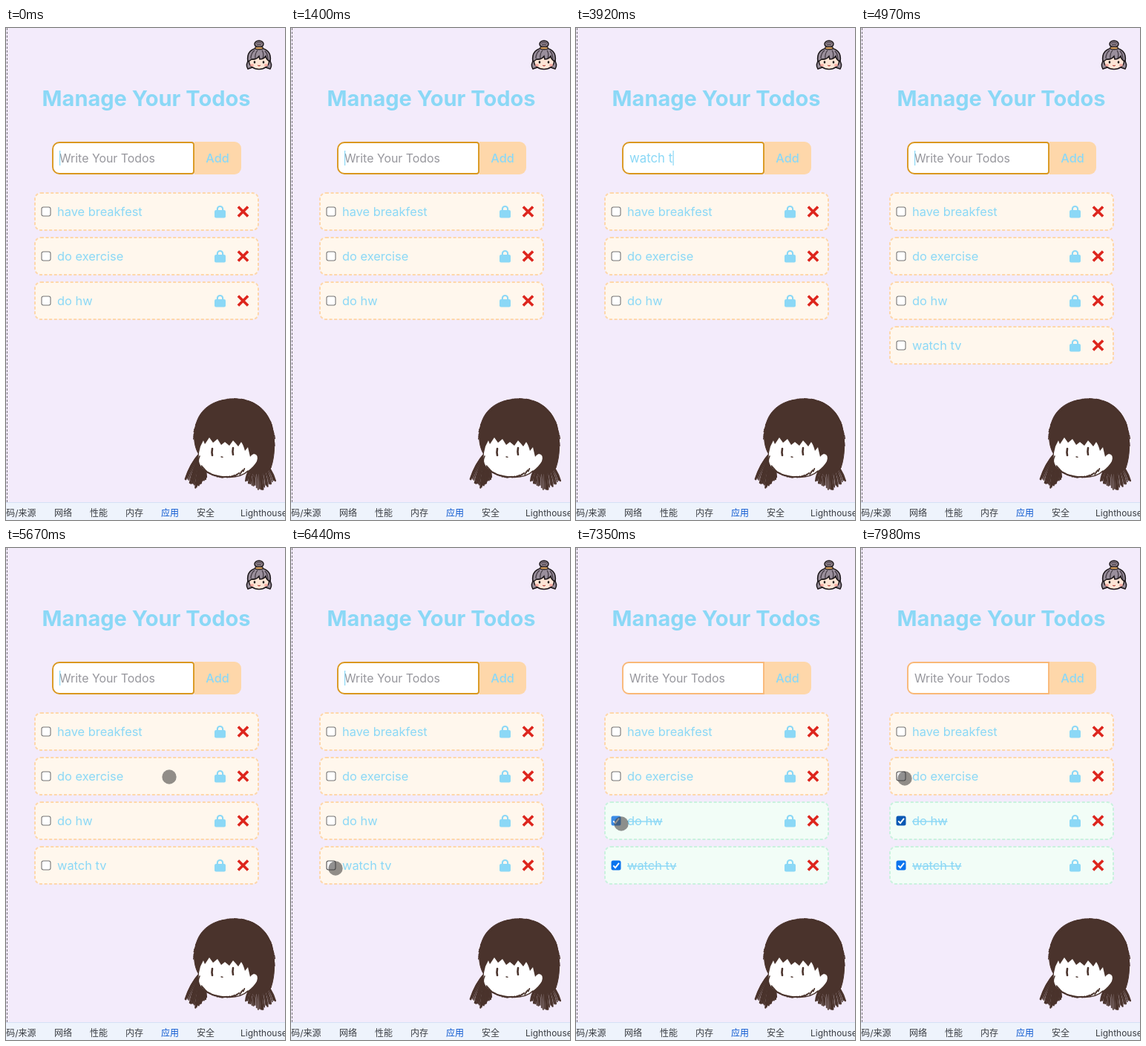
These frames come from a looping animation (376x662 px, 8000 ms). An HTML page with a canvas:

```html
<!DOCTYPE html>
<html lang="en">
<head>
<meta charset="utf-8">
<title>Manage Your Todos</title>
<style>
  html, body { margin: 0; width: 100%; height: 100%; overflow: hidden; background: #f3ebfb; }
  canvas { display: block; width: 376px; height: 662px; }
</style>
</head>
<body>
<canvas id="stage"></canvas>
<script>
const W = 376, H = 662, LOOP = 8000, STEP = 70;
const SKY = '#8bd8f6', PEACH = '#fed7aa', BROWN = '#4a332c';
const FONT = 'Inter, "Noto Sans", sans-serif';
const canvas = document.getElementById('stage');
const ctx = canvas.getContext('2d');
const dpr = window.devicePixelRatio || 1;
canvas.width = W * dpr;
canvas.height = H * dpr;

const tasks = [
  { text: 'have breakfest' },
  { text: 'do exercise' },
  { text: 'do hw', doneAt: 7350 },
  { text: 'watch tv', addedAt: 4830, doneAt: 6580 }
];
const draft = 'watch tv';
const keyTimes = [2100, 2240, 2800, 3010, 3150, 3430, 3920, 4410];
const SUBMIT = 4830, BLUR = 6580, PRESS = 140;

// Pointer path: time, x, y
const route = [
  [5320, 330, 204], [5670, 220, 308], [6090, 86, 443], [6440, 60, 431],
  [6650, 60, 431], [7210, 61, 371], [7420, 61, 371], [7980, 59, 310]
];

function text(str, x, y, font, color, align = 'left') {
  ctx.font = font;
  ctx.fillStyle = color;
  ctx.textAlign = align;
  ctx.fillText(str, x, y);
}

function box(x, y, w, h, r, fill, stroke, width = 1) {
  ctx.beginPath();
  ctx.roundRect(x, y, w, h, r);
  if (fill) { ctx.fillStyle = fill; ctx.fill(); }
  if (stroke) { ctx.strokeStyle = stroke; ctx.lineWidth = width; ctx.stroke(); }
}

function shape(d, fill, stroke, width = 1) {
  const p = new Path2D(d);
  if (fill) { ctx.fillStyle = fill; ctx.fill(p); }
  if (stroke) { ctx.strokeStyle = stroke; ctx.lineWidth = width; ctx.stroke(p); }
}

function oval(x, y, rx, ry, fill, stroke, width = 1) {
  ctx.beginPath();
  ctx.ellipse(x, y, rx, ry, 0, 0, Math.PI * 2);
  if (fill) { ctx.fillStyle = fill; ctx.fill(); }
  if (stroke) { ctx.strokeStyle = stroke; ctx.lineWidth = width; ctx.stroke(); }
}

function seeded(seed) {
  return () => (seed = (seed * 16807) % 2147483647) / 2147483647;
}

function drawInput(t) {
  const focused = t < BLUR;
  box(254, 153, 63, 44, [0, 9, 9, 0], PEACH);
  text('Add', 285, 181, `500 16.3px ${FONT}`, SKY, 'center');
  box(63, 154, 190, 42, focused ? [9, 3, 3, 9] : [8, 0, 0, 8], '#fff',
      focused ? '#da981f' : '#f9b877', 1.9);

  const typed = t < SUBMIT ? draft.slice(0, keyTimes.filter(k => k <= t).length) : '';
  const font = `16.8px ${FONT}`;
  if (typed) text(typed, 72, 181, font, SKY);
  else text('Write Your Todos', 72, 181, `15.9px ${FONT}`, '#97979d');
  if (focused) {
    ctx.font = font;
    const x = 72 + (typed ? ctx.measureText(typed).width + 0.3 : 0);
    ctx.fillStyle = SKY;
    ctx.fillRect(x, 165, 1.2, 20);
  }
}

function drawLock(x, y) {
  box(x - 7.5, y - 2, 15, 10.5, 2, SKY);
  shape(`M${x - 3.6} ${y} v-3.4 a3.6 3.6 0 0 1 7.2 0 v3.4`, null, SKY, 2.2);
}

function drawCross(x, y) {
  shape(`M${x - 6.6} ${y - 6.6} l13.2 13.2 M${x + 6.6} ${y - 6.6} l-13.2 13.2`, null, '#dd251d', 3.6);
}

function drawCheckbox(y, done, hover, pressed) {
  if (!done) {
    box(48, y - 6, 12, 12, 2.5, '#fff', hover ? '#4f4f4f' : '#767676', 1.1);
    return;
  }
  box(47.5, y - 6.5, 13, 13, 2.5, pressed ? '#3b8be6' : hover ? '#0a58b4' : '#0b74ee');
  shape(`M50.3 ${y + 0.3} l2.7 2.9 l5 -6.4`, null, '#fff', 1.9);
}

function drawTask(task, row, t) {
  if (t < (task.addedAt || 0)) return;
  const done = t >= task.doneAt, y = 247 + row * 60;
  ctx.setLineDash([4, 2.6]);
  box(39, y - 25, 301, 50, 8, done ? '#f2fdf7' : '#fff7ed', done ? '#c9f2de' : PEACH, 2);
  ctx.setLineDash([]);

  const hover = (row === 3 && t >= 6440 && t < 7210) ||
                (row === 2 && t >= 7210) || (row === 1 && t >= 7980);
  drawCheckbox(y, done, hover, done && t < task.doneAt + PRESS);
  text(task.text, 69, y + 5.7, `16.4px ${FONT}`, SKY);
  if (done) ctx.fillRect(69, y + 0.3, ctx.measureText(task.text).width, 1.4);
  drawLock(288.5, y);
  drawCross(319.5, y);
}

function drawBadge() {
  const ink = '#1d181b', hair = '#9a8f9c';
  shape('M328 42 Q322 49 326 55 L332 53 M354 42 Q360 49 356 55 L350 53', hair, ink, 1.5);
  oval(341, 45, 13.5, 10.5, '#fde5d6', ink, 1.5);
  shape('M326 45 C324 33 331 27 341 27 C351 27 358 33 356 45 ' +
        'Q351 43 350 38 Q347 42 342 42 L341 38 Q337 43 331 42 Q329 44 326 45 Z', hair, ink, 1.6);
  shape('M335 30 Q330 34 330 41 M339 30 Q335 35 336 41 M345 30 Q348 34 346 41 M349 31 Q353 35 353 42',
        null, '#3d353d', 1.2);
  oval(341, 21.5, 6, 4.6, '#8c7f89', ink, 1.5);
  shape('M337 20.5 Q341 17.5 345 20.5 M338 23 Q341 21 344 23', null, '#3d353d', 0.9);
  oval(341, 27, 5.5, 1.9, '#d6a05f', ink, 1.1);
  oval(335, 46, 1.3, 1.7, ink);
  oval(347, 46, 1.3, 1.7, ink);
  oval(331.5, 50, 2.5, 1.7, '#f7aaa0');
  oval(350.5, 50, 2.5, 1.7, '#f7aaa0');
  shape('M339 50 Q341 52.5 343 50', '#e2685e', '#a44840', 0.9);
}

// A fan of loose strands from one root.
function drawTail(rootX, rootY, left, right, tip, bend, rnd) {
  const mid = (left + right) / 2;
  for (let i = 0; i < 20; i++) {
    const k = i / 19;
    const x = left + (right - left) * k;
    const y = tip - 13 * Math.abs(x - mid) / (right - mid) - 4 * rnd();
    const mx = (rootX + x) / 2 + bend * (2 * k - 1), my = (rootY + y) / 2 - 3;
    shape(`M${rootX + 5 * k} ${rootY} Q${mx} ${my} ${x} ${y}`, null, BROWN, 1.4 + rnd() * 1.6);
  }
}

// Short pencil ticks along an arc.
function pencil(cx, cy, rx, ry, from, to, count, width, rnd) {
  for (let i = 0; i < count; i++) {
    const a = from + (to - from) * i / (count - 1), r = 0.99 + 0.025 * rnd();
    const x = cx + rx * r * Math.cos(a), y = cy + ry * r * Math.sin(a);
    shape(`M${x} ${y} l${-4 * Math.sin(a) + rnd()} ${4 * Math.cos(a) + rnd()}`, null, BROWN, width);
  }
}

function drawGirl() {
  const rnd = seeded(37);
  ctx.lineCap = ctx.lineJoin = 'round';
  drawTail(261, 573, 242, 270, 620, 3, rnd);
  drawTail(340, 582, 323, 363, 623, 7, rnd);
  shape('M260 574 C251 560 252 538 260 523 C270 505 289 499 309 499 ' +
        'C333 499 351 512 358 534 C363 553 363 574 357 592 C350 600 338 602 326 598 Z',
        BROWN, BROWN, 1);
  pencil(307, 553, 54, 54, Math.PI, Math.PI * 2.1, 60, 1.4, rnd);
  // face under a side-swept fringe
  shape('M262 563 Q257 580 262 590 Q271 602 294 604 Q316 606 326 596 Q334 590 338 583 ' +
        'Q341 574 334 573 Q331 574 329 577 L326 564 L322 569 Q320 561 317 557 L313 563 ' +
        'Q309 558 306 555 L301 562 L295 557 L290 561 L285 553 L279 558 L274 551 L268 560 L266 555 Z',
        '#fff');
  shape('M261 576 Q257 584 262 590 Q271 602 294 604 Q316 606 326 596', null, BROWN, 1.6);
  pencil(294, 577, 34, 27, Math.PI * 0.2, Math.PI * 0.82, 20, 1.7, rnd);
  shape('M278 566 Q277 571 278 575 M306 565 Q305 570 306 574', null, BROWN, 2.6);
  shape('M290 577 l2 0.4', null, BROWN, 1.3);
  ctx.lineCap = 'butt';
  ctx.lineJoin = 'miter';
}

function drawTabs() {
  ctx.fillStyle = '#eef3fc';
  ctx.fillRect(0, 638, W, 24);
  ctx.fillStyle = '#d5e1f5';
  ctx.fillRect(0, 638, W, 1);
  const font = '12px Inter, "Noto Sans CJK SC", "Noto Sans CJK", sans-serif';
  const ink = '#3a3d42';
  text('源代码/来源', 40.5, 656.5, font, ink, 'right');
  ['网络', '性能', '内存', '应用', '安全'].forEach((label, i) =>
    text(label, 65 + 48 * i, 656.5, font, i === 3 ? '#0b57d0' : ink));
  text('Lighthouse', 316, 656.5, font, ink);
}

function drawPointer(t) {
  if (t < route[0][0]) return;
  let i = 0;
  while (i < route.length - 2 && t >= route[i + 1][0]) i++;
  const [t0, x0, y0] = route[i], [t1, x1, y1] = route[i + 1];
  let k = Math.min(1, (t - t0) / (t1 - t0));
  if (i > 2) k = k * k * (3 - 2 * k);
  oval(x0 + (x1 - x0) * k, y0 + (y1 - y0) * k, 9.7, 9.7, 'rgba(66,64,64,.58)');
}

function draw(now) {
  const t = Math.floor((now % LOOP) / STEP) * STEP;
  ctx.setTransform(dpr, 0, 0, dpr, 0, 0);
  ctx.fillStyle = '#f3ebfb';
  ctx.fillRect(0, 0, W, H);
  ctx.setLineDash([3, 2]);
  shape('M1.5 0 V638', null, '#77747c', 1);
  ctx.setLineDash([]);

  drawBadge();
  text('Manage Your Todos', 189, 105, `700 29px ${FONT}`, SKY, 'center');
  drawInput(t);
  tasks.forEach((task, row) => drawTask(task, row, t));
  drawGirl();
  drawTabs();
  drawPointer(t);
  requestAnimationFrame(draw);
}
requestAnimationFrame(draw);
</script>
</body>
</html>
```
